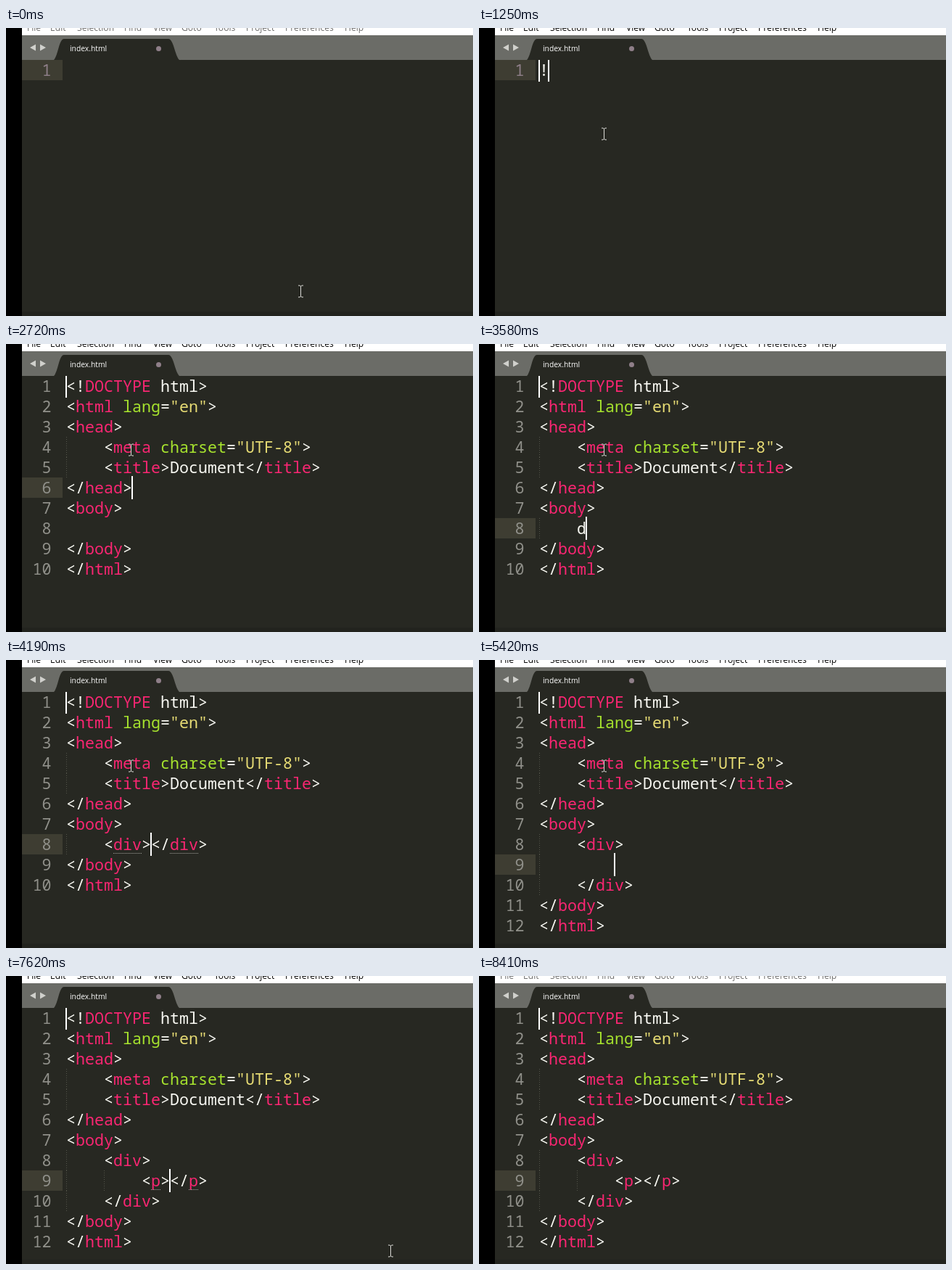
Animation of 644 by 397 pixels, one loop 8470 ms. Source, as an HTML page:

```html
<!DOCTYPE html>
<html lang="en">
<head>
<meta charset="UTF-8">
<title>Typing an HTML page</title>
<style>
html, body { margin: 0; width: 100%; height: 100%; overflow: hidden; background: #272822; }
svg { display: block; }
text { white-space: pre; }
#code text { font: 21.667px "Noto Sans Mono", "DejaVu Sans Mono", monospace; fill: #f8f8f2; }
#code .num { fill: #90908a; text-anchor: end; }
#code .early { fill: #8f7f89; }
.str { fill: #e6db74; }
.attr { fill: #a6e22e; }
.tag { fill: #f92672; }
.guide { stroke: #53544a; stroke-dasharray: 1 2; }
.match { stroke: #a0a09a; stroke-dasharray: 1 1; }
.caret { fill: #fff; }
#menu text { font: 12.1px "Open Sans", sans-serif; }
#name { font: 10.3px "Open Sans", sans-serif; fill: #fff; }
</style>
</head>
<body>
<svg width="644" height="397" viewBox="0 0 644 397">
  <rect width="644" height="397" fill="#272822"/>
  <rect y="391" width="644" height="6" fill="#22231e"/>
  <g id="code"></g>
  <rect y="10" width="644" height="34" fill="#6b6c67"/>
  <path d="M66 44C72 38 73 15 80 15H224C231 15 233 38 239 44Z" fill="#272822"/>
  <path d="M41 22.500v9l-8-4.500zM47 22.500v9l8-4.500z" fill="#d0d0cc"/>
  <text id="name" x="88" y="32">index.html</text>
  <circle cx="210.500" cy="28.500" r="3.500" fill="#8f7f89"/>
  <rect width="644" height="10" fill="#fff"/>
  <g id="menu"></g>
  <rect width="22" height="397" fill="#000"/>
  <path id="mouse" d="M-3 -8H-1L.5 -7L2 -8H4M.5 -7V7M-3 8H-1L.5 7L2 8H4" fill="none" stroke="#dcdcd8"/>
</svg>
<script>
const LOOP = 8470, FOCUS = 550, BLUR = 8410;
const LEFT = 83, TOP = 44, CHAR = 13, ROW = 28;
const $ = id => document.getElementById(id);
const colX = col => LEFT + col * CHAR;
const rowY = row => TOP + row * ROW;

const menu = { File: 29, Edit: 61, Selection: 98, Find: 163, View: 203, Goto: 242,
  Tools: 287, Project: 331, Preferences: 385, Help: 467 };
$('menu').innerHTML = Object.entries(menu)
  .map(([label, x]) => `<text x="${x}" y="4">${label}</text>`).join('');

const page = (...body) => ['<!DOCTYPE html>', '<html lang="en">', '<head>',
  '    <meta charset="UTF-8">', '    <title>Document</title>', '</head>',
  '<body>', ...body, '</body>', '</html>'];
const inDiv = line => page('    <div>', '        ' + line, '    </div>');

// start time, lines, caret row, caret column
const steps = [
  [0, [''], 0, 0],
  [1250, ['!'], 0, 1],
  [1730, page(''), 4, 19],
  [2720, page(''), 5, 7],
  [2950, page(''), 6, 6],
  [3120, page(''), 7, 0],
  [3500, page('    '), 7, 4],
  [3580, page('    d'), 7, 5],
  [3810, page('    di'), 7, 6],
  [4040, page('    div'), 7, 7],
  [4190, page('    <div></div>'), 7, 9],
  [5420, inDiv(''), 8, 8],
  [5820, inDiv('p'), 8, 9],
  [6060, inDiv('<p></p>'), 8, 11]
];

// start time, caret opacity
const blinks = [[0, 1], [2030, .4], [2190, 0], [2340, 1], [7080, .25], [7232, 0], [7385, 1]];
const latest = (list, t) => list.findLast(item => item[0] <= t);

const TOKEN = /(".*?")|(\b(?:lang|charset)\b)|((?<=<[!\/]?)\w+)|\w+|[^"\w]/g;
const highlight = line => line.replace(TOKEN, (text, str, attr, tag) => {
  const kind = str ? 'str' : attr ? 'attr' : tag ? 'tag' : '';
  return kind ? `<tspan class="${kind}">${text}</tspan>` : text.replace('<', '&lt;');
});

const bar = (col, row, opacity) =>
  `<rect class="caret" x="${colX(col) - 1}" y="${rowY(row) - 2}" width="2" height="32" opacity="${opacity}"/>`;

function guides(line, row) {
  let indent = line.match(/^ */)[0].length, out = '';
  if (!line.trim()) indent -= 4;
  for (let col = 0; col < indent; col += 4)
    out += `<path class="guide" d="M${colX(col) + .5} ${rowY(row)}v${ROW}"/>`;
  return out;
}

function underlines(line, row, col) {
  if (line.slice(col - 1, col + 2) !== '></') return '';
  return [...line.matchAll(/\w+/g)].map(m =>
    `<path class="match" d="M${colX(m.index)} ${rowY(row) + 26.5}h${m[0].length * CHAR}"/>`).join('');
}

function drawCode(t, focused) {
  const [, lines, row, col] = latest(steps, t);
  let out = `<rect x="22" y="${rowY(row)}" width="56" height="${ROW}" fill="#3e3d32"/>`;
  lines.forEach((line, i) => {
    const y = rowY(i) + 22;
    out += `<text class="num${lines.length < 2 ? ' early' : ''}" x="62.5" y="${y}">${i + 1}</text>`
      + guides(line, i) + `<text x="${LEFT}" y="${y}">${highlight(line)}</text>`;
  });
  if (focused) out += underlines(lines[row], row, col) + bar(col, row, latest(blinks, t)[1]);
  // the first caret is never cleared
  if (t >= FOCUS) out += bar(0, 0, 1);
  return out;
}

const mix = (a, b, p) => Math.round(a + (b - a) * p);

function mouseAt(t) {
  if (t < FOCUS) {
    const k = Math.min(6, Math.floor((t + 10) / 80)) / 6;
    const p = k * (1.4 - .4 * k);
    return [mix(406, 172, p), mix(363, 146, p)];
  }
  if (t < 7080) return [172, 146];
  const k = Math.floor((t - 7080) / 76.25) / 7;
  return k > 1 ? null : [mix(209, 530, k ** 1.2), mix(152, 379, k ** 1.5)];
}

let shown;
function frame(now) {
  const t = now % LOOP, focused = t >= FOCUS && t < BLUR;
  const code = drawCode(t, focused);
  if (code !== shown) $('code').innerHTML = shown = code;
  $('menu').setAttribute('fill', focused ? '#000' : '#6d6d6d');
  const spot = mouseAt(t);
  $('mouse').setAttribute('visibility', spot ? 'visible' : 'hidden');
  if (spot) $('mouse').setAttribute('transform', `translate(${spot})`);
}

const start = performance.now();
function tick() {
  frame(performance.now() - start);
  requestAnimationFrame(tick);
}
tick();
</script>
</body>
</html>
```
